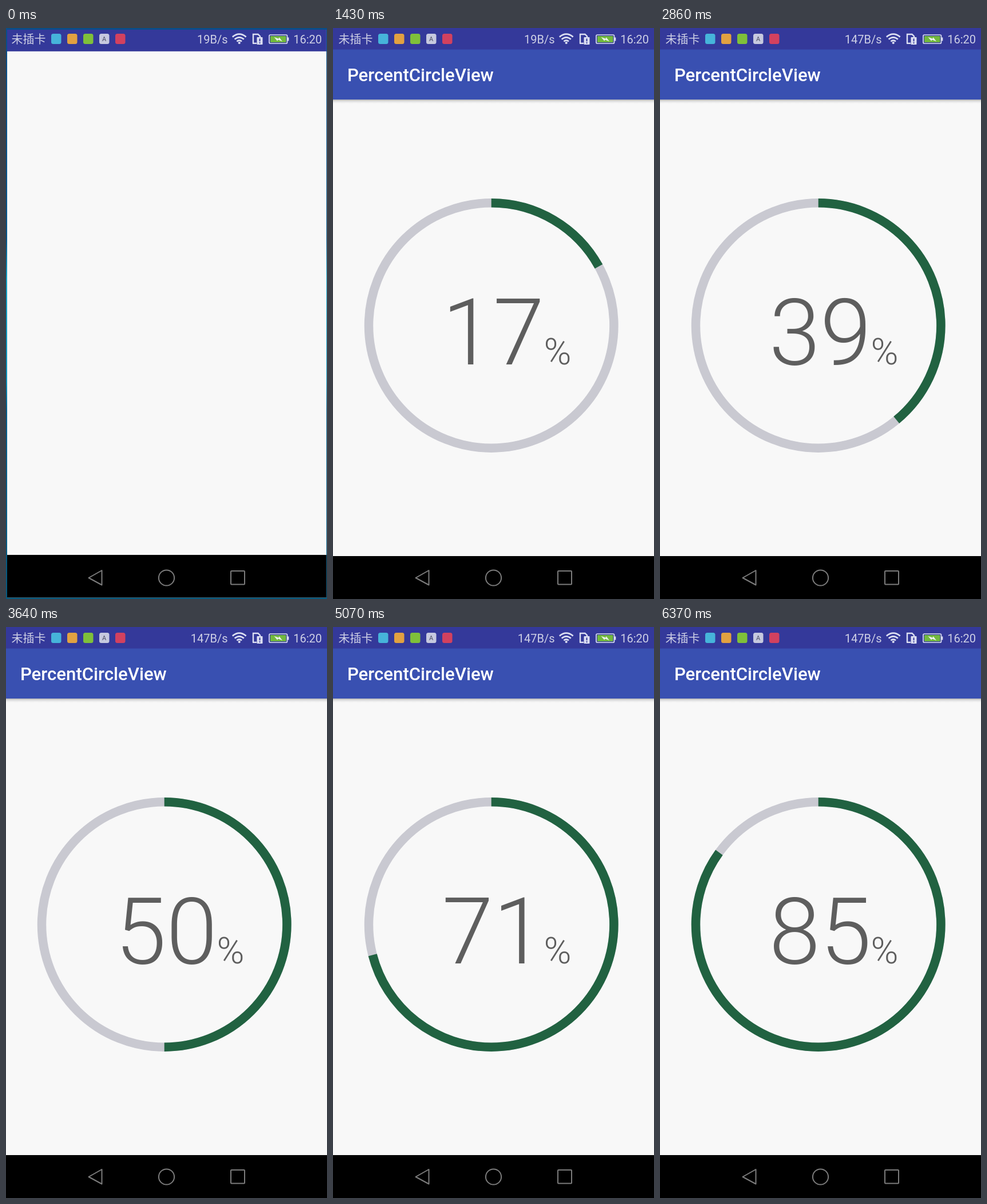
These frames come from a looping animation (561x998 px, 6500 ms). An HTML page:

```html
<!DOCTYPE html>
<html lang="zh">
<head>
<meta charset="utf-8">
<title>PercentCircleView</title>
<style>
  html, body { margin: 0; width: 100%; height: 100%; overflow: hidden; background: #f8f8f8; }
  svg { display: block; width: 100vw; height: 100vh; font-family: Roboto, "Noto Sans CJK SC", "Noto Sans CJK", sans-serif; }
  .status { font-size: 20px; fill: #cfd1e6; }
  .line { fill: none; stroke: #7c7c7c; stroke-width: 2; stroke-linejoin: round; }
  .ring { fill: none; stroke-width: 15.5; }
  .value { font-weight: 300; fill: #5e5e5e; }
</style>
</head>
<body>
<svg viewBox="0 0 561 998">
  <defs>
    <linearGradient id="sky" x1="0" y1="0" x2="0" y2="1">
      <stop offset="0" stop-color="#0a4d88"/>
      <stop offset=".37" stop-color="#06568a"/>
      <stop offset=".44" stop-color="#12a0c4"/>
      <stop offset=".62" stop-color="#0b8fb8"/>
      <stop offset=".67" stop-color="#055f8c"/>
      <stop offset="1" stop-color="#05597f"/>
    </linearGradient>
    <linearGradient id="shade" x1="0" y1="0" x2="0" y2="1">
      <stop offset="0" stop-color="#000" stop-opacity=".27"/>
      <stop offset=".45" stop-color="#000" stop-opacity=".09"/>
      <stop offset="1" stop-color="#000" stop-opacity="0"/>
    </linearGradient>
  </defs>

  <rect width="561" height="998" fill="url(#sky)"/>

  <g id="app">
    <rect width="561" height="998" fill="#f8f8f8"/>
    <rect width="561" height="38" fill="#34399a"/>
    <g id="content">
      <rect y="125" width="561" height="7" fill="url(#shade)"/>
      <rect y="37.6" width="561" height="87.4" fill="#3950b1"/>
      <text x="24.9" y="93" font-size="31.17" font-weight="500" fill="#fff">PercentCircleView</text>
      <circle class="ring" cx="276.7" cy="520" r="214.2" stroke="#c9c9d1"/>
      <circle class="ring" id="arc" cx="276.7" cy="520" r="214.2" stroke="#216241"
              pathLength="100" transform="rotate(-90 276.7 520)"/>
      <text class="value" id="num" x="280" y="587.5" font-size="161" text-anchor="middle"></text>
      <text class="value" id="sign" y="587.5" font-size="65">%</text>
    </g>
    <rect y="923" width="561" height="75"/>
  </g>

  <g class="status">
    <text x="9.5" y="27">未插卡</text>
    <text id="speed" x="387.5" y="27" text-anchor="end"></text>
    <text x="552" y="27" text-anchor="end">16:20</text>
  </g>

  <rect x="79" y="10" width="17.5" height="18" rx="3.5" fill="#46b4da"/>
  <rect x="107" y="10" width="17.5" height="18" rx="3.5" fill="#e2a141"/>
  <rect x="135" y="10" width="17.5" height="18" rx="3.5" fill="#7fc03a"/>
  <rect x="163" y="10" width="17.5" height="18" rx="3.5" fill="#c6c9df"/>
  <text x="171.7" y="22.5" font-size="11" fill="#4a4c62" text-anchor="middle">A</text>
  <rect x="191" y="10" width="17.5" height="18" rx="3.5" fill="#d2415f"/>

  <g fill="none" stroke="#dcdff2" stroke-width="2.7">
    <path d="M395.8 15.6Q407.7 5.6 419.6 15.6"/>
    <path d="M399.6 19.8Q407.7 12.8 415.8 19.8"/>
    <path d="M403.4 23.6Q407.7 19.8 412 23.6"/>
  </g>
  <circle cx="407.7" cy="26" r="2.1" fill="#dcdff2"/>

  <path d="M432 27V11H440.5L444 14.5V17" fill="none" stroke="#dcdff2" stroke-width="2.4"/>
  <path d="M431 26.8H438" stroke="#dcdff2" stroke-width="2.4"/>
  <rect x="438.5" y="16" width="10" height="13" rx="1" fill="#dcdff2"/>
  <path d="M443.5 18.5V23.5M443.5 25V27" stroke="#34399a" stroke-width="2"/>

  <rect x="460" y="12" width="31.5" height="15" rx="2" fill="#34399a" stroke="#dcdff2" stroke-width="1.7"/>
  <rect x="462" y="14" width="27.5" height="11" fill="#72b93e"/>
  <rect x="492" y="16.5" width="2.3" height="6" fill="#dcdff2"/>
  <path d="M468.5 16L476.5 18.8L477.5 16.3L483 23.5L475.5 20.5L474.3 22.8Z" fill="#eef2ee"/>

  <g class="line">
    <path d="M144.5 961L167.5 948V973.5Z"/>
    <circle cx="280.5" cy="961" r="13.6"/>
    <rect x="393" y="949" width="24" height="23.5" rx="1"/>
  </g>
</svg>
<script>
  const LOOP = 6500, TICK = 130;
  const $ = id => document.getElementById(id);
  const clamp = (v, lo, hi) => Math.min(hi, Math.max(lo, v));

  // A quicker run up to 30, then a steady count that stops at 85
  function percent(t) {
    const v = t < 2210
      ? 7.5 + (t - 780) * 22.8 / 1430
      : 30.3 + (t - 2210) * 0.0143;
    return clamp(Math.floor(v), 1, 85);
  }

  function draw(now) {
    const t = Math.floor(now % LOOP / TICK) * TICK;
    const p = percent(t), text = String(p);

    $("app").setAttribute("transform", t < TICK ? "translate(2 3) scale(.9945)" : "");
    $("content").setAttribute("opacity", clamp((t - 655) / 150, 0, 1));
    $("arc").setAttribute("stroke-dasharray", p + " 100");
    $("num").textContent = text;
    $("sign").setAttribute("x", 278.2 + 45.2 * text.length);
    $("speed").textContent = t < 2860 ? "19B/s" : "147B/s";
  }

  function loop() {
    draw(performance.now());
    requestAnimationFrame(loop);
  }
  loop();
</script>
</body>
</html>
```
